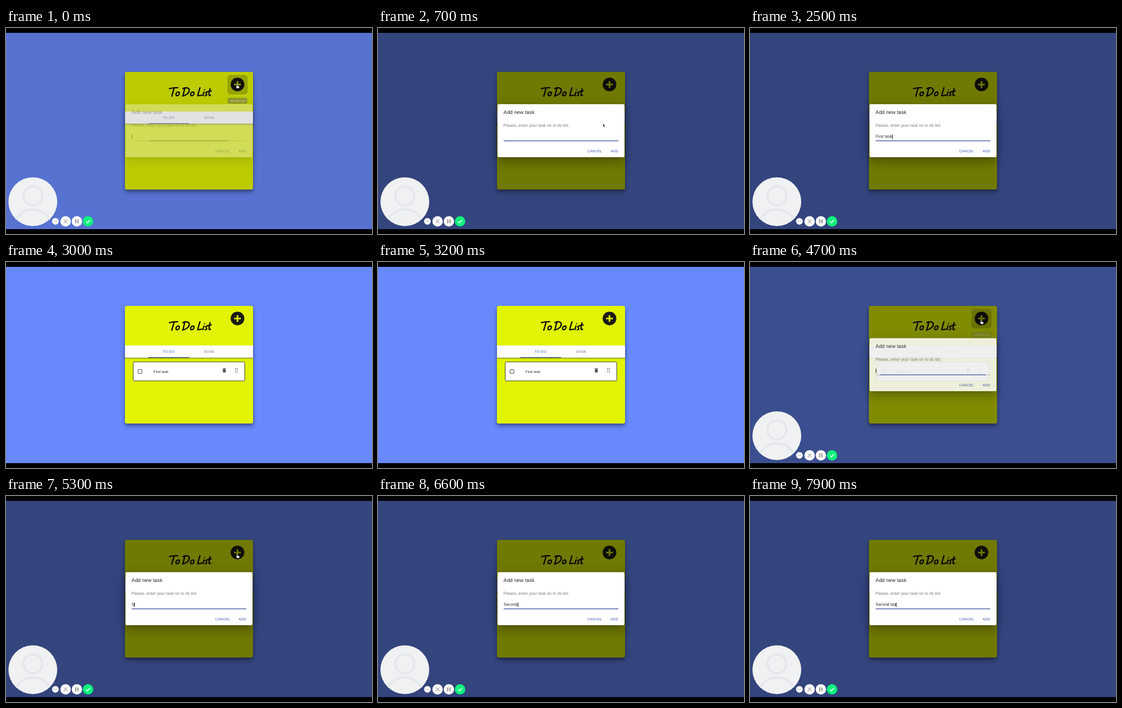
Animation of 600x338 px, one loop 8 s. Source, as an HTML page:

```html
<!DOCTYPE html>
<html lang="en">
<head>
<meta charset="utf-8">
<title>To Do List</title>
<style>
  html, body { margin: 0; width: 100%; height: 100%; overflow: hidden; background: #000; }
  body { font-family: "Liberation Sans", Arial, sans-serif; text-rendering: geometricPrecision; }
  #stage { position: absolute; left: 0; top: 0; width: 600px; height: 338px; overflow: hidden; }
  #page { position: absolute; left: 0; top: 8px; width: 600px; height: 321.5px; overflow: hidden; background: #6889fb; }
  #page > * { margin-top: -8px; }
  .box { position: absolute; box-sizing: border-box; }
  svg { position: absolute; left: 0; top: 0; width: 600px; height: 338px; }

  #card { left: 195px; top: 72px; width: 210px; height: 193px; border-radius: 3px; background: #e2f404;
    box-shadow: 0 3px 5px rgba(0,0,0,.28), 0 5px 9px rgba(0,0,0,.2); }
  #tabs { left: 195px; top: 137px; width: 210px; height: 20px; background: #fff;
    box-shadow: 0 1px 1px rgba(0,0,0,.35), 0 2px 4px rgba(0,0,0,.12); }
  #backdrop { left: 0; top: 0; width: 600px; height: 338px; background: rgba(0,0,0,.5); }
  #dialog { left: 0; top: 0; width: 600px; height: 338px; }
  #paper { left: 196px; top: 125px; width: 208px; height: 87px; border-radius: 2px; background: #fff;
    box-shadow: 0 4.6px 6.2px -2.9px rgba(0,0,0,.2), 0 10px 15.8px 1.2px rgba(0,0,0,.14), 0 3.7px 19px 3.3px rgba(0,0,0,.12); }
  #input { left: 206px; top: 173.6px; height: 10px; font-size: 6.65px; line-height: 10px; white-space: pre; color: #222; }
  #caret { position: absolute; top: 1px; width: .8px; height: 7.6px; background: #222; }

  .small { font-size: 5.8px; letter-spacing: .0286em; text-anchor: middle; }
  .body { font-size: 6.65px; letter-spacing: .0094em; }
  .ink { fill: none; stroke: #0c0d04; stroke-width: 2.1; stroke-linecap: round; stroke-linejoin: round; }

  .loop { animation: 8s linear infinite; }
  .step { animation-timing-function: step-end; }

  #backdrop, #dialog { animation-name: open; }
  @keyframes open {
    0% { opacity: .33; animation-timing-function: ease-out; }
    2.06%, 32.5% { opacity: 1; animation-timing-function: cubic-bezier(.4,0,.2,1); }
    34.94% { opacity: 0; }
    57.12% { opacity: 0; animation-timing-function: cubic-bezier(.4,0,.2,1); }
    59.94%, 100% { opacity: 1; }
  }
  #focus { transform-box: fill-box; transform-origin: center; animation-name: grow; }
  @keyframes grow {
    0% { transform: scaleX(.69); animation-timing-function: ease-out; }
    1.75%, 57.11% { transform: scaleX(1); }
    57.12% { transform: scaleX(0); animation-timing-function: cubic-bezier(0,0,.2,1); }
    59.62%, 100% { transform: scaleX(1); }
  }
  #task { animation-name: added; }
  @keyframes added { 0% { opacity: 0; } 32.5%, 100% { opacity: 1; } }

  #ripple { animation-name: ripple; }
  @keyframes ripple {
    0% { opacity: .2; }
    4%, 49% { opacity: 0; }
    51%, 56.5% { opacity: .05; }
    58%, 59.5% { opacity: .17; }
    63.5%, 100% { opacity: 0; }
  }
  #tip { animation-name: tip; }
  @keyframes tip {
    0% { opacity: .5; }
    1.6%, 51.2% { opacity: 0; }
    53.5%, 57.2% { opacity: .9; }
    58.75% { opacity: .28; }
    60%, 100% { opacity: 0; }
  }
  #cursor { animation-name: move; }
  @keyframes move {
    0%, 3.1% { transform: translate(378px, 92px); animation-timing-function: ease-in-out; }
    7.5%, 43.1% { transform: translate(369px, 157px); animation-timing-function: ease-in-out; }
    50%, 100% { transform: translate(378.2px, 95px); }
  }
  #hand { animation-name: hand; }
  @keyframes hand {
    0% { opacity: 1; }
    3.5% { opacity: 0; }
    49.4% { opacity: 1; }
    67.3%, 100% { opacity: 0; }
  }
  #arrow { animation-name: arrow; }
  @keyframes arrow {
    0% { opacity: 0; }
    3.5% { opacity: 1; }
    12.2% { opacity: 0; }
    43.1% { opacity: 1; }
    49.4%, 100% { opacity: 0; }
  }
  #recorder { animation-name: recorder; }
  @keyframes recorder {
    0%, 33.2% { opacity: 1; }
    35.5%, 43.5% { opacity: 0; }
    46%, 100% { opacity: 1; }
  }
</style>
</head>
<body>
<div id="stage">
  <div id="page">
    <div id="card" class="box"></div>
    <div id="tabs" class="box"></div>
    <svg viewBox="0 0 600 338">
      <g class="ink" role="img" aria-label="To Do List">
        <path d="M268 99.4C272 98.5 277 97.8 281.5 98M275.5 98.8C274.5 103 273 107 271.8 112"/>
        <path id="o" d="M283 105C280 104.5 278.3 107.5 278.6 109.5C279 112 283 111.5 284 108.5C284.8 106 284 104.8 282 105.2"/>
        <path d="M293 99.5C292 103 291 108 290 111.5M290 99.5C295 97 300.5 98 300.5 102C300.5 106.5 295 111 289.4 111.6"/>
        <use href="#o" x="24"/>
        <path d="M318 98C316.5 103 314.8 108 314.4 111.3C317 110.8 319 110.5 321 110.2"/>
        <path d="M324.6 105C324 107 323.3 109 323.1 111M325.5 101.2v.1"/>
        <path d="M330.3 105.2C328.5 104.6 326.8 106 328 107.4C329.6 109 329.8 110.8 326.6 111.2"/>
        <path d="M334.5 99.5C333.6 104 332.6 108 332.8 110C333 111.3 334.5 111 335.2 110.2M330.8 104.2L336.6 103.2"/>
      </g>
      <circle cx="379.5" cy="92.7" r="11.2" fill="#1b1c10"/>
      <path d="M374 92.7h11M379.5 87.2v11" stroke="#e2f404" stroke-width="2.6"/>
      <rect id="ripple" class="loop" x="363" y="77" width="33" height="32" rx="5"/>
      <g class="small">
        <text x="266.6" y="149.3" fill="#3f5a96">TO DO</text>
        <text x="333.2" y="149.3" fill="#757575">DONE</text>
      </g>
      <rect x="233.3" y="156" width="66.7" height="1.2" fill="#4a5f9c"/>
      <g id="task" class="loop step">
        <rect x="208.5" y="163.9" width="183" height="31.2" rx="1.8" fill="#fff" stroke="#4c5030"/>
        <rect x="216.4" y="176.5" width="6.4" height="6.4" rx=".8" fill="none" stroke="#555" stroke-width="1"/>
        <text x="241.8" y="181.9" font-size="5.9" letter-spacing=".05" fill="#222">First task</text>
        <path transform="translate(353.1 172.9) scale(.4)" fill="#555" d="M6 19c0 1.1.9 2 2 2h8c1.1 0 2-.9 2-2V7H6v12zM19 4h-3.5l-1-1h-5l-1 1H5v2h14V4z"/>
        <path d="M376.5 174.9v6.1M379.3 174.9v6.1" stroke="#555" stroke-width="1.6" stroke-linecap="round" stroke-dasharray="0 2.9"/>
      </g>
    </svg>
    <div id="backdrop" class="box loop"></div>
    <div id="dialog" class="box loop">
      <div id="paper" class="box"></div>
      <svg viewBox="0 0 600 338">
        <text x="205.8" y="141.2" font-size="8.3" letter-spacing=".07" fill="#212121">Add new task</text>
        <text x="205.8" y="162.2" class="body" fill="#757575">Please, enter your task on to do list.</text>
        <rect x="206" y="185" width="188" height=".5" fill="#949494"/>
        <rect id="focus" class="loop" x="206" y="184.5" width="188" height="1.1" fill="#3f51a5"/>
        <g class="small" fill="#3f51b5">
          <text x="355.2" y="203.6">CANCEL</text>
          <text x="387.5" y="203.6">ADD</text>
        </g>
      </svg>
      <div id="input" class="box"><span id="typed"></span><i id="caret"></i></div>
    </div>
    <svg viewBox="0 0 600 338">
      <g id="tip" class="loop">
        <rect x="363.5" y="114.6" width="32" height="9.4" rx="1.6" fill="#616161"/>
        <text x="379.5" y="120.8" font-size="4.15" text-anchor="middle" fill="#fff">Add new task</text>
      </g>
    </svg>
  </div>
  <svg viewBox="0 0 600 338">
    <defs><clipPath id="round"><circle cx="44" cy="285" r="38.5"/></clipPath></defs>
    <g id="cursor" class="loop" stroke-linejoin="round">
      <path id="hand" class="loop step" fill="#fff" stroke="#111" stroke-width=".5"
        d="M0 .6Q.7-.3 1.4.6V3L4 3.6Q4.7 3.8 4.6 4.6L4.1 7H.6L-1.6 4.3Q-1.5 3.4-.6 3.8L0 4.4Z"/>
      <path id="arrow" class="loop step" fill="#111" stroke="#fff" stroke-width=".4"
        d="M0 0V5L1.2 4L2 5.8L2.9 5.4L2.1 3.6H3.6Z"/>
    </g>
    <g id="recorder" class="loop">
      <circle cx="44" cy="285" r="40" fill="#f3f4f4"/>
      <circle cx="44" cy="285" r="38.5" fill="#eff1f2"/>
      <g clip-path="url(#round)" fill="none" stroke="#e4e8ea" stroke-width="3.6">
        <circle cx="44" cy="275.5" r="15.5"/>
        <circle cx="44" cy="329" r="31.5"/>
      </g>
      <g fill="#fff">
        <circle cx="81" cy="317.2" r="5.5"/>
        <circle cx="97.7" cy="317.2" r="8.5"/>
        <circle cx="116.2" cy="317.2" r="8.5"/>
        <circle cx="134.5" cy="317.2" r="8.5" fill="#0df27c"/>
      </g>
      <g fill="none" stroke-width="1.3">
        <path d="M78.2 317.2h5.6" stroke="#999" stroke-dasharray="1.2 1"/>
        <path d="M94.7 314.2l6 6m0-6l-6 6" stroke="#b4b4b4"/>
        <path d="M114.5 314v6.4M118 314v6.4" stroke="#666"/>
        <path d="M131 317.4l2.5 2.4l4.6-5" stroke="#fff"/>
      </g>
    </g>
  </svg>
</div>
<script>
  const LOOP = 8000;
  // Each run: moment the field gets focus, its text, and the time of every key press.
  const runs = [
    { focus: -60, text: 'First task', keys: [980, 1090, 1280, 1390, 1580, 1690, 1880, 1980, 2180, 2280] },
    { focus: 4570, text: 'Second tas', keys: [5190, 5390, 5580, 5880, 6090, 6290, 6680, 7480, 7680, 7880] }
  ];
  const typed = document.getElementById('typed');
  const caret = document.getElementById('caret');
  const start = performance.now();

  function draw() {
    const t = (performance.now() - start) % LOOP;
    const run = t < runs[1].focus ? runs[0] : runs[1];
    const count = run.keys.filter(k => k <= t).length;
    const last = count ? run.keys[count - 1] : run.focus;
    const value = run.text.slice(0, count);
    if (typed.textContent !== value) typed.textContent = value;
    caret.style.opacity = (t - last) % 1000 < 500 ? 1 : 0;
    requestAnimationFrame(draw);
  }
  draw();
</script>
</body>
</html>
```
